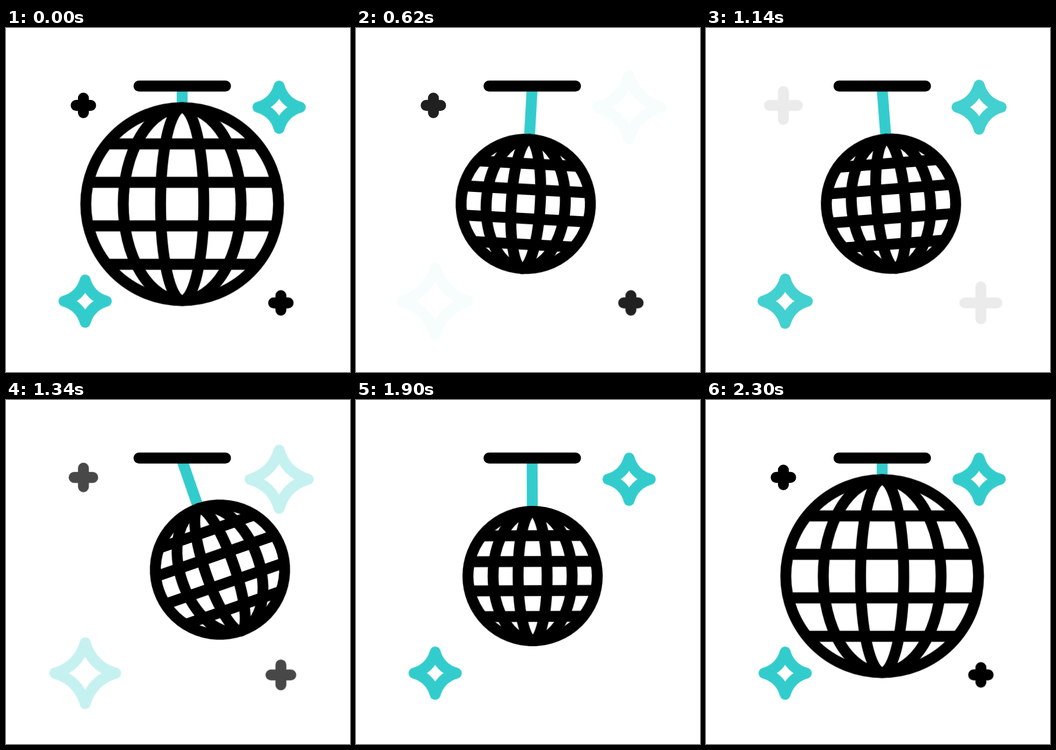
These frames come from a looping animation (640 by 640 pixels, 2400 ms). An HTML page:

```html
<!DOCTYPE html>
<html lang="en">
<head>
<meta charset="utf-8">
<title>Disco ball</title>
<style>
  html, body { margin: 0; width: 100%; height: 100%; overflow: hidden; background: #fff; }
  svg { display: block; width: 100vw; height: 100vh; }

  .ink, .teal { fill: none; stroke: #000; stroke-width: 20.3; stroke-linecap: round; stroke-linejoin: round; }
  .teal { stroke: #3cc; }
  .flat { stroke-linecap: butt; }
  path, circle, ellipse { vector-effect: non-scaling-stroke; }

  .swing, .ball, .spark, .plus {
    animation: 2400ms cubic-bezier(.333, 0, .667, 1) infinite;
    transform-origin: 0 0;
  }
  .swing { animation-name: swing; }
  .ball { animation-name: shrink; }
  .spark {
    d: path("M0-39.3Q8.8-8.8 39.3 0Q8.8 8.8 0 39.3Q-8.8 8.8-39.3 0Q-8.8-8.8 0-39.3Z");
    animation-name: spark;
  }
  .plus {
    d: path("M-13.5 0H13.5M0-13.5V13.5");
    animation-name: grow, fade;
  }

  @keyframes swing {
    0%, 21.667% { transform: rotate(0deg); }
    38.333% { transform: rotate(20deg); }
    54.375% { transform: rotate(-20deg); }
    69.375% { transform: rotate(10deg); }
    78.75% { transform: rotate(-.25deg); }
    81.667%, 100% { transform: rotate(0deg); }
  }
  @keyframes shrink {
    0%, 5% { transform: scale(1); }
    21.667%, 79.167% { transform: scale(.671); }
    95.833%, 100% { transform: scale(1); }
  }
  @keyframes spark {
    0%, 5%, 44.5%, 79.375%, 100% { transform: scale(1); opacity: 1; }
    28.75%, 62% { transform: scale(var(--max)); opacity: 0; }
  }
  @keyframes grow {
    0%, 28.75%, 62%, 95.833%, 100% { transform: scale(1); }
    44.5%, 79.375% { transform: scale(var(--max)); }
  }
  @keyframes fade {
    0% { opacity: 1; }
    23.125% { opacity: 1; animation-timing-function: linear; }
    44.5%, 79.375% { opacity: 0; }
    62%, 95.833%, 100% { opacity: 1; }
  }
</style>
</head>
<body>
<svg viewBox="0 0 640 640">
  <g transform="translate(327.7 113)">
    <g class="swing">
      <path class="teal flat" d="M0-5V160"/>
      <g transform="translate(0 214.6)">
        <g class="ball ink flat">
          <circle r="179.3" fill="#fff"/>
          <ellipse rx="109.6" ry="179.3"/>
          <ellipse rx="40.2" ry="179.3"/>
          <path d="M-140-112H140M-174.5-40.5H174.5M-174.5 40.5H174.5M-140 112H140"/>
        </g>
      </g>
    </g>
  </g>

  <path class="ink" d="M247.4 108H408.4"/>

  <g class="teal">
    <g transform="translate(508.1 147.4)"><path class="spark" style="--max: 1.524"/></g>
    <g transform="translate(147.3 508.2)"><path class="spark" style="--max: 1.611"/></g>
  </g>
  <g class="ink">
    <g transform="translate(144 144)"><path class="plus" style="--max: 2.007"/></g>
    <g transform="translate(511.4 511.4)"><path class="plus" style="--max: 2.319"/></g>
  </g>
</svg>
</body>
</html>
```
